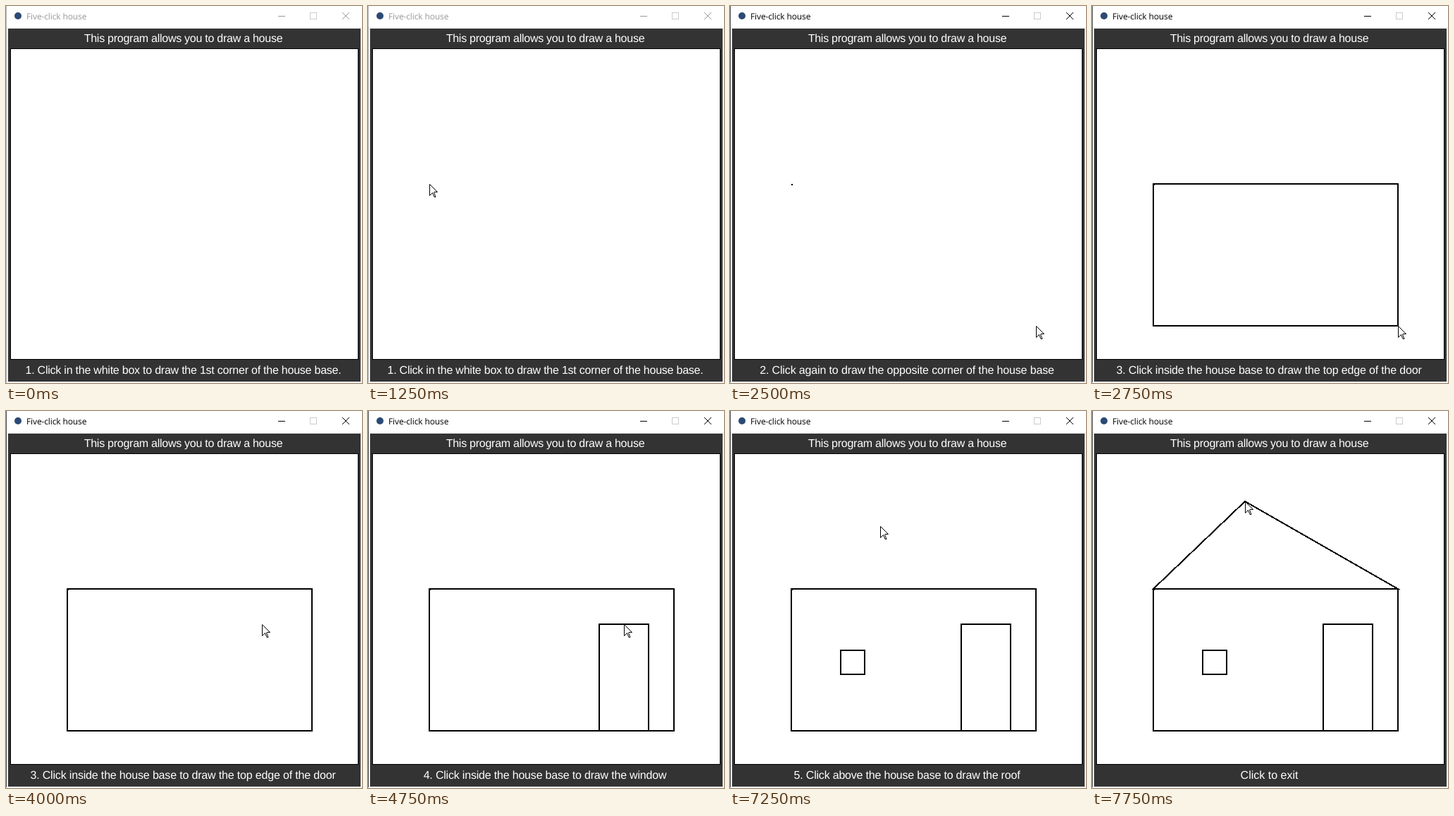
An HTML page for the animation above (8000 ms loop, 505 by 534 pixels).

```html
<!DOCTYPE html>
<html lang="en">
<head>
<meta charset="utf-8">
<title>Five-click house</title>
<style>
  html, body { margin: 0; width: 100%; height: 100%; overflow: hidden; background: #fff; }
  svg { display: block; }
  .stage { width: 505px; height: 534px; shape-rendering: crispEdges; }

  text { text-rendering: geometricPrecision; font-kerning: none; }
  .label { font: 16px "Liberation Sans", Arial, sans-serif; fill: #fff; text-anchor: middle; }
  .caption { font: 12px "Open Sans", sans-serif; letter-spacing: -.12px; fill: currentColor; }

  /* every change is a hard cut on one shared 8 s clock */
  .focus, .dot, .base, .door, .window, .roof, .messages, .cursor {
    animation: 8s step-end infinite;
  }
  .dot, .base, .door, .window, .roof { visibility: hidden; }
  .focus { animation-name: focus; }
  .dot { animation-name: dot; }
  .base { animation-name: base; }
  .door { animation-name: door; }
  .window { animation-name: window; }
  .roof { animation-name: roof; }
  .messages { animation-name: messages; }
  .cursor { animation-name: cursor; }

  .house { fill: none; stroke: #000; stroke-width: 2; }
  .buttons { fill: none; stroke: currentColor; }

  @keyframes focus  { 0% { color: #999; } 18.75%, 100% { color: #000; } }
  @keyframes dot    { 18.75%, 100% { visibility: visible; } }
  @keyframes base   { 34.375%, 100% { visibility: visible; } }
  @keyframes door   { 59.375%, 100% { visibility: visible; } }
  @keyframes window { 78.125%, 100% { visibility: visible; } }
  @keyframes roof   { 96.875%, 100% { visibility: visible; } }

  @keyframes messages {
    0%            { transform: translateY(0); }
    18.75%        { transform: translateY(-30px); }
    34.375%       { transform: translateY(-60px); }
    59.375%       { transform: translateY(-90px); }
    78.125%       { transform: translateY(-120px); }
    96.875%, 100% { transform: translateY(-150px); }
  }

  @keyframes cursor {
    0%      { transform: translate(-40px, 367px); }
    6.25%   { transform: translate(126px, 367px); }
    9.375%  { transform: translate(84px, 288px); }
    12.5%   { transform: translate(86px, 256px); }
    15.625% { transform: translate(87px, 252px); }
    18.75%  { transform: translate(114px, 273px); }
    21.875% { transform: translate(382px, 446px); }
    25%     { transform: translate(411px, 463px); }
    28.125% { transform: translate(433px, 455px); }
    31.25%  { transform: translate(434px, 453px); }
    40.625% { transform: translate(384px, 425px); }
    43.75%  { transform: translate(366px, 315px); }
    46.875% { transform: translate(363px, 303px); }
    50%     { transform: translate(363px, 302px); }
    62.5%   { transform: translate(303px, 328px); }
    65.625% { transform: translate(183px, 357px); }
    68.75%  { transform: translate(174px, 356px); }
    84.375% { transform: translate(244px, 327px); }
    87.5%   { transform: translate(254px, 181px); }
    90.625% { transform: translate(213px, 163px); }
    93.75%, 100% { transform: translate(217px, 128px); }
  }
</style>
</head>
<body>
<svg class="stage" viewBox="0 0 505 534">
  <rect width="505" height="534" fill="#fff"/>
  <rect y="30" width="505" height="504" fill="#f0f0f0"/>

  <!-- title bar -->
  <g class="focus">
    <rect width="1" height="533" fill="currentColor" opacity=".7"/>
    <text class="caption" x="29" y="19">Five-click house</text>
    <g class="buttons">
      <path d="M386 14.5h10"/>
      <path d="M477 9l10 10M487 9l-10 10" shape-rendering="auto"/>
    </g>
  </g>
  <circle cx="17" cy="14" r="5" fill="#2b4a74" shape-rendering="auto"/>
  <rect x="431.5" y="9.5" width="9" height="9" fill="none" stroke="#ccc"/>

  <!-- panel and drawing area -->
  <rect x="3" y="32" width="500" height="500" fill="#333"/>
  <rect x="6.5" y="60.5" width="493" height="440" fill="#fff" stroke="#000"/>
  <text class="label" x="251.5" y="51" letter-spacing="-.26">This program allows you to draw a house</text>

  <svg y="502" width="505" height="30">
    <g class="messages label">
      <text x="251.5" y="19" letter-spacing="-.23">1. Click in the white box to draw the 1st corner of the house base.</text>
      <text x="251" y="49" letter-spacing="-.14">2. Click again to draw the opposite corner of the house base</text>
      <text x="251" y="79" letter-spacing="-.17">3. Click inside the house base to draw the top edge of the door</text>
      <text x="251" y="109" letter-spacing="-.19">4. Click inside the house base to draw the window</text>
      <text x="251" y="139" letter-spacing="-.2">5. Click above the house base to draw the roof</text>
      <text x="251.5" y="169">Click to exit</text>
    </g>
  </svg>

  <g class="house">
    <path class="dot" d="M87 253h2"/>
    <path class="base" d="M87 252h347v201H87z"/>
    <path class="door" d="M328 302h70v151h-70z"/>
    <path class="window" d="M157 339h34v34h-34z"/>
    <path class="roof" d="M87 252L217 128L434 252z"/>
  </g>

  <path class="cursor" d="M.5.5V16.5L4.5 12.5L7 18.5H9L6.5 12L7 11.5H11.5z" fill="#fff" stroke="#000" shape-rendering="auto"/>
</svg>
</body>
</html>
```
